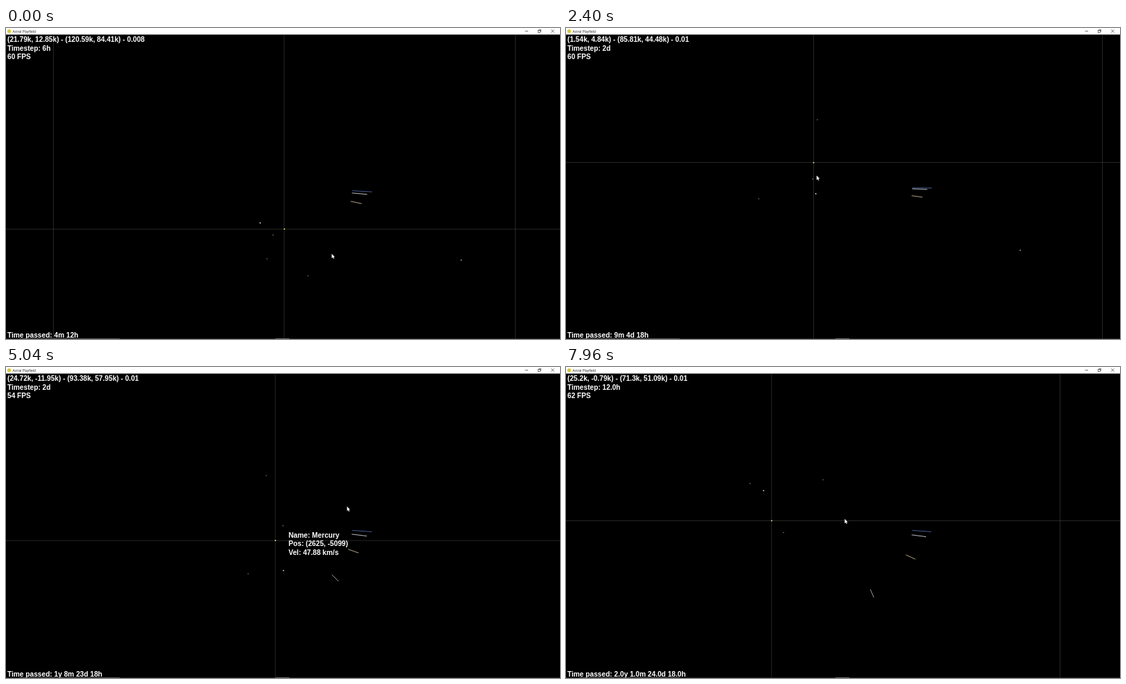
Recreate the animation shown at these times as an HTML page with a canvas. Size 800 by 450 pixels, loop 8 s.

```html
<!DOCTYPE html>
<html lang="en">
<head>
<meta charset="utf-8">
<title>Astral Playfield</title>
<style>
html, body { margin: 0; width: 100%; height: 100%; overflow: hidden; background: #000; }
canvas { display: block; width: 800px; height: 450px; }
</style>
</head>
<body>
<canvas id="stage" width="800" height="450"></canvas>
<script>
const ctx = document.getElementById('stage').getContext('2d');
const LOOP = 8000, TICK = 40, TOP = 9.5, CX = 400, CY = 229.7;
const SCREEN = 2.4; // simulated screen pixels per stage pixel
const ZOOM_AT = 1760, FOLLOW_AT = 3440, DRAG_AT = 7520, DRAG_END = 7920;

// Keys are [time, value, ...]
const MOUSE = [
  [-40, 474.6, 333.7], [0, 470, 326], [800, 388.33, 237.4], [1760, 388.33, 237.4],
  [3000, 337.08, 190.33], [3440, 337.08, 190.33], [4300, 492.08, 201.17],
  [5900, 492.08, 201.17], [6500, 487.08, 208.25], [7520, 487.08, 208.25],
  [DRAG_END, 402.08, 219.08]
];
// Sun relative to the centre, before zooming
const PAN = [[0, 1.97, 61.17], [400, -37.2, -20.1], [1760, -37.2, -20.1], [2300, -33.97, -27.9]];
const PAN_END = [297.08, 222.375];
// Days of motion and days on the clock
const TIMELINE = [
  [0, 0, 120.5], [800, 24, 140], [1600, 116.4, 215.75], [1760, 134.8, 242],
  [2200, 134.8, 242], [3360, 265, 431.75], [3560, 265, 431.75], [5040, 375.164, 593.75],
  [5640, 434.46, 659.75], [6680, 475.476, 732.75], [7200, 487.4, 744.75]
];
const STEPS = [[0, '6h', .25], [400, '12h', .5], [600, '1d', 1], [800, '2d', 1],
  [5440, '1.0d', 1], [5970, '12.0h', .5]];
const FPS = [[0, 60], [2600, 61], [4400, 54], [6000, 61], [7000, 62]];

// Start angle, degrees per day, orbit radius, colour, size
const PLANETS = [
  [153.3, 4.2146, 5671.44, '#8c8c8c', 1.3],
  [194.1, 1.602, 10820, '#dedede', 1.6],
  [120.1, .984, 14960, '#77808f', 1.3],
  [63.3, .5295, 22750, '#8a7a74', 1.3],
  [10, .0828, 77800, '#beb5a8', 1.5],
  [5, .0335, 142700, '#d2bd9c', 1.5],
  [1.55, .0117, 287000, '#d8dde2', 1.5],
  [.97, .006, 450000, '#5468ac', 1.5]
];

const smooth = k => k * k * (3 - 2 * k);
const current = (list, t) => list.filter(e => e[0] <= t).pop();
const kilo = v => +(v / 1000).toFixed(2) + 'k';
const rad = deg => deg * Math.PI / 180;

function at(keys, t, ease = k => k) {
  const i = keys.findIndex(key => key[0] >= t);
  if (i < 1) return keys.at(i).slice(1);
  const a = keys[i - 1], b = keys[i];
  const k = ease((t - a[0]) / (b[0] - a[0]));
  return a.slice(1).map((v, j) => v + (b[j + 1] - v) * k);
}

function place([start, rate, orbit, color, size], index, day) {
  let deg = start + rate * day, r = orbit;
  if (index === 0) { // the innermost orbit is slightly eccentric
    deg += 3 * Math.sin(rad(deg - 182));
    r += 148.6 * Math.cos(rad(deg - 1.9));
  }
  return { x: r * Math.cos(rad(deg)), y: r * Math.sin(rad(deg)), color, size };
}

function sunAt(t, target, unit) {
  if (t < FOLLOW_AT) {
    const [x, y] = at(PAN, t, smooth), zoom = 300 / unit;
    return [CX + x * zoom, CY + y * zoom];
  }
  const held = [CX - target.x / unit, CY - target.y / unit];
  return at([[DRAG_AT, ...held], [DRAG_END, ...PAN_END]], t, smooth);
}

function clockText(days, t) {
  const step = current(STEPS, t)[2];
  const total = Math.round((days - .75) / step) * step + .75;
  const rest = total % 360, d = rest % 30;
  const parts = [[Math.floor(total / 360), 'y'], [Math.round(rest / 30), 'm'],
    [Math.floor(d), 'd'], [Math.round(d % 1 * 24), 'h']];
  return parts.filter(p => p[0])
    .map(([n, u]) => (t < 5440 ? n : n.toFixed(1)) + u).join(' ');
}

function line(x1, y1, x2, y2, color, width) {
  ctx.strokeStyle = color;
  ctx.lineWidth = width;
  ctx.beginPath();
  ctx.moveTo(x1, y1);
  ctx.lineTo(x2, y2);
  ctx.stroke();
}
function dot(x, y, size, color) {
  ctx.fillStyle = color;
  ctx.fillRect(x - size / 2, y - size / 2, size, size);
}
function label(text, x, y) {
  ctx.font = 'bold 10.16px "Liberation Sans", Arial, sans-serif';
  ctx.fillStyle = '#fff';
  ctx.fillText(text, x, y);
}

// Grid lines are one simulated screen pixel wide
function grid(sx, sy, unit) {
  const gap = 100000 / unit, thin = 1 / SCREEN;
  const snap = v => Math.floor(v * SCREEN) / SCREEN;
  ctx.fillStyle = '#5c5c5c';
  for (let x = sx % gap; x < 800; x += gap) ctx.fillRect(snap(x), TOP, thin, 450);
  for (let y = TOP + (sy - TOP) % gap; y < 450; y += gap) ctx.fillRect(0, snap(y), 800, thin);
}

function drawPlanet(p, sx, sy, unit) {
  const x = sx + p.x / unit, y = sy + p.y / unit;
  if (x >= 0 && x <= 800 && y >= TOP && y <= 450) {
    dot(x, y, p.size, p.color);
    return;
  }
  // Pointer towards a body outside the view
  const dx = x - CX, dy = y - CY, dist = Math.hypot(dx, dy);
  const end = 110.3 + dist * unit / 24400;
  const ux = dx / dist, uy = dy / dist;
  line(CX + ux * 100, CY + uy * 100, CX + ux * end, CY + uy * end, p.color, .85);
}

function panel(p) {
  const dr = Math.hypot(p.x, p.y) - 5735;
  const vel = 47.88 - .00648 * dr + 3.917e-6 * dr * dr;
  const rows = ['Name: Mercury', `Pos: (${Math.round(p.x)}, ${Math.round(p.y)})`,
    `Vel: ${vel.toFixed(2)} km/s`];
  rows.forEach((row, i) => label(row, 408, 246.6 + i * 12.55));
}

function cursor(x, y) {
  const shape = [[0, 0], [0, 6.5], [1.5, 5.1], [2.5, 7.3], [3.5, 6.9], [2.6, 4.7], [4.4, 4.6]];
  ctx.beginPath();
  shape.forEach(([px, py]) => ctx.lineTo(x + .4 + px, y + .7 + py));
  ctx.closePath();
  ctx.fillStyle = '#fff';
  ctx.fill();
}

function windowFrame() {
  ctx.fillStyle = '#fff';
  ctx.fillRect(0, 0, 800, TOP);
  ctx.fillStyle = '#d8c840';
  ctx.beginPath();
  ctx.arc(4.5, 4.7, 2.7, 0, 7);
  ctx.fill();
  ctx.font = '4.9px "Open Sans", sans-serif';
  ctx.fillStyle = '#222';
  ctx.fillText('Astral Playfield', 9.5, 6.5);
  line(749.5, 4.6, 754, 4.6, '#333', .7);
  ctx.strokeRect(768.3, 3.4, 3, 3);
  line(769.3, 2.4, 772.4, 2.4, '#333', .7);
  line(772.4, 2.4, 772.4, 5.4, '#333', .7);
  line(787.3, 2.4, 791.5, 6.6, '#333', .7);
  line(791.5, 2.4, 787.3, 6.6, '#333', .7);
  line(0, 449.6, 800, 449.6, '#2c2c2c', .8);
  line(20, 449.6, 164, 449.6, '#6a6a6a', .8);
  line(389, 449.6, 409, 449.6, '#8a8a8a', .8);
}

function draw(t) {
  const scale = t < ZOOM_AT ? .008 : .01, unit = SCREEN / scale;
  const [day, clock] = at(TIMELINE, t);
  const bodies = PLANETS.map((p, i) => place(p, i, day));
  const [sx, sy] = sunAt(t, bodies[0], unit);
  const [hx, hy] = at(MOUSE, t - TICK, smooth); // the readout lags one tick

  ctx.fillStyle = '#000';
  ctx.fillRect(0, 0, 800, 450);
  grid(sx, sy, unit);
  dot(sx, sy, 1.7, '#e6df72');
  bodies.forEach(p => drawPlanet(p, sx, sy, unit));
  if (t >= FOLLOW_AT && t < DRAG_AT) panel(bodies[0]);

  const view = `(${kilo((hx - sx) * unit)}, ${kilo((hy - sy) * unit)})`;
  const offset = `(${kilo(sx * unit)}, ${kilo((sy - TOP) * unit)})`;
  const rows = [`${view} - ${offset} - ${scale}`, 'Timestep: ' + current(STEPS, t)[1],
    current(FPS, t)[1] + ' FPS'];
  rows.forEach((row, i) => label(row, 2, 20.2 + i * 12.6));
  label('Time passed: ' + clockText(clock, t), 2, 448.2);
  windowFrame();
  cursor(...at(MOUSE, t, smooth));
}

const start = performance.now();
function frame() {
  const t = (performance.now() - start) % LOOP;
  draw(Math.floor(t / TICK) * TICK);
  requestAnimationFrame(frame);
}
frame();
</script>
</body>
</html>
```
